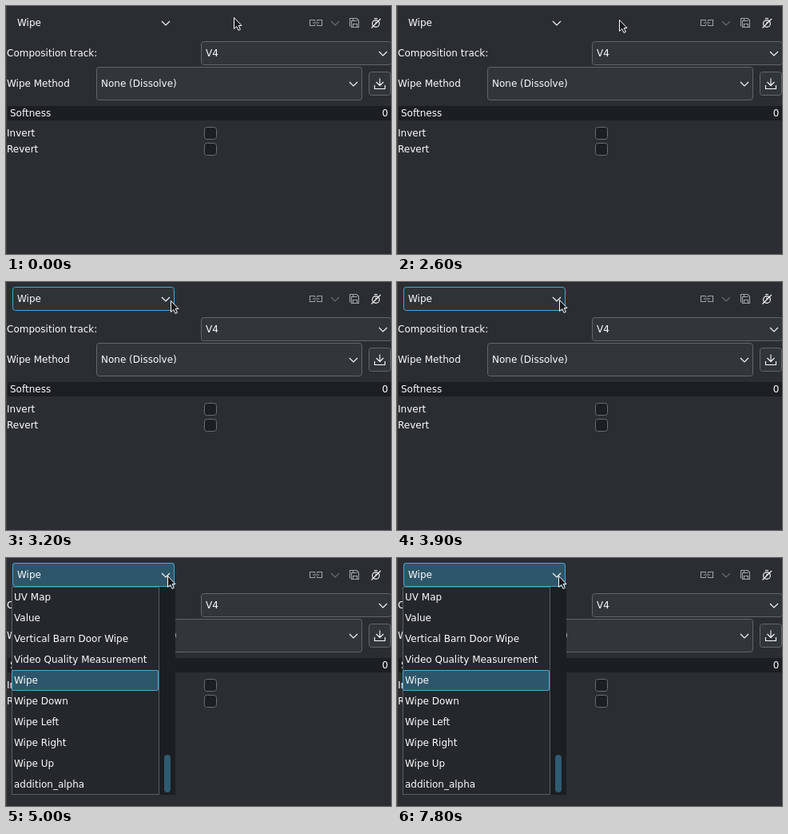
These frames come from a looping animation (482 px wide and 310 px high, 8 s). An HTML page:

```html
<!DOCTYPE html>
<html lang="en">
<head>
<meta charset="utf-8">
<title>Composition settings</title>
<style>
  html, body { margin: 0; width: 100%; height: 100%; overflow: hidden; background: #2a2e32; }
  svg { display: block; width: 482px; height: 310px; }
  text { font: 12px "DejaVu Sans", sans-serif; fill: #fcfcfc; white-space: pre; }
  .box { fill: #31363b; stroke: #62666a; }
  .check { fill: #1b1e22; stroke: #696d71; }
  .dark { fill: #1b1e22; }
  .line { fill: none; stroke: #fcfcfc; stroke-width: 1.1; }
  .soft { stroke: #a0a3a6; }
  .dim { stroke: #696d71; }
  .active { fill: #2e566a; stroke: #4ba6d2; }
  .hover { fill: #2e3338; stroke: #4ba6d2; }

  .timed { animation: 8s step-end infinite; }
  #hover { animation-name: hover; }
  #tip { animation-name: tip; }
  #menu, #open { animation-name: menu; }
  #cursor { animation-name: move; }

  @keyframes hover { 0% { opacity: 0; } 38.75% { opacity: .5; } 40%, 100% { opacity: 1; } }
  @keyframes tip { 0%, 62.5%, 100% { opacity: 0; } 58.75% { opacity: 1; } }
  @keyframes menu { 0% { opacity: 0; } 62.5%, 100% { opacity: 1; } }
  @keyframes move {
    0% { transform: translate(285px, 14px); }
    32.5% { transform: translate(278px, 17px); }
    33.75% { transform: translate(264px, 18px); }
    35% { transform: translate(247px, 19px); }
    36.25% { transform: translate(231px, 21px); }
    37.5% { transform: translate(218px, 22px); }
    38.75% { transform: translate(209px, 23px); }
    40% { transform: translate(206px, 23px); }
    43.75% { transform: translate(205px, 23px); }
    46.25% { transform: translate(204px, 23px); }
    48.75% { transform: translate(203px, 22px); }
    53.75%, 100% { transform: translate(202px, 22px); }
  }
</style>
</head>
<body>
<svg viewBox="0 0 482 310">
  <defs>
    <path id="chevron" d="M-5 -2.5L0 2.5L5 -2.5"/>
  </defs>
  <rect width="482" height="310" fill="#2a2e32"/>
  <rect width="1" height="310" fill="#4a4639"/>

  <!-- Header -->
  <rect id="hover" class="hover timed" x="8.5" y="6.5" width="202" height="29" rx="3"/>
  <rect id="open" class="active timed" x="8.5" y="6.5" width="202" height="29" rx="3"/>
  <text x="14" y="25">Wipe</text>
  <use class="line" href="#chevron" x="200" y="21.5"/>
  <g class="line soft">
    <path d="M386.5 17.5H380.5V24.5H386.5M389.5 17.5H395.5V24.5H389.5M384 21H392M386.5 17.5V19M386.5 23V24.5M389.5 17.5V19M389.5 23V24.5"/>
    <path d="M430.5 25.5V15.5H439L441.5 18V26.5H432.5V18.5H439.5M434.5 26.5V22.5H439.5V26.5M434.5 15.5V18.5"/>
  </g>
  <use class="line dim" href="#chevron" x="412" y="21.5"/>
  <g class="line">
    <circle cx="463" cy="22" r="4.4"/>
    <path d="M461 15.5H465M463 22V19.5M457.5 27.5L469 16"/>
  </g>

  <!-- Parameters -->
  <text x="1" y="63">Composition track:</text>
  <rect class="box" x="244.5" y="44.5" width="238" height="29" rx="3"/>
  <text x="250" y="63">V4</text>
  <use class="line" href="#chevron" x="472" y="59.5"/>

  <text x="1" y="101">Wipe Method</text>
  <rect class="box" x="113.5" y="76.5" width="332" height="41" rx="3"/>
  <text x="119" y="101">None (Dissolve)</text>
  <use class="line" href="#chevron" x="435" y="97.5"/>
  <rect class="box" x="454.5" y="82.5" width="27" height="29" rx="3"/>
  <path class="line" d="M468 90.5V99M463.5 95L468 99.5L472.5 95M461.5 99V103.5H474.5V99"/>

  <rect class="dark" x="2" y="125" width="480" height="18"/>
  <text x="5" y="138">Softness</text>
  <text x="478.5" y="138" text-anchor="end">0</text>

  <text x="1" y="163">Invert</text>
  <rect class="check" x="248.5" y="151.5" width="15" height="15" rx="3"/>
  <text x="1" y="183">Revert</text>
  <rect class="check" x="248.5" y="171.5" width="15" height="15" rx="3"/>

  <g id="tip" class="timed">
    <rect class="box" x="202.5" y="45.5" width="163" height="21" rx="3"/>
    <text x="207" y="60">Change composition type</text>
  </g>

  <g id="menu" class="timed">
    <rect class="dark" x="7" y="36" width="205" height="260"/>
    <rect x="7.5" y="36.5" width="184" height="259" fill="#24272b" stroke="#5b5f63"/>
    <rect class="active" x="7.5" y="140.5" width="183" height="25" rx="1.5"/>
    <rect x="198" y="246" width="8" height="47" rx="4" fill="#305b70"/>
    <g id="items"></g>
  </g>

  <path id="cursor" class="timed" d="M.5 .5V14.5L3.8 11.5L6 16.4L8.4 15.3L6.2 10.5H10Z" fill="#17191c" stroke="#fcfcfc" stroke-linejoin="round"/>
</svg>
<script>
  const names = ["UV Map", "Value", "Vertical Barn Door Wipe", "Video Quality Measurement", "Wipe",
    "Wipe Down", "Wipe Left", "Wipe Right", "Wipe Up", "addition_alpha"];
  document.getElementById("items").innerHTML = names
    .map((name, i) => `<text x="10" y="${53 + 26 * i}">${name}</text>`)
    .join("");
</script>
</body>
</html>
```
